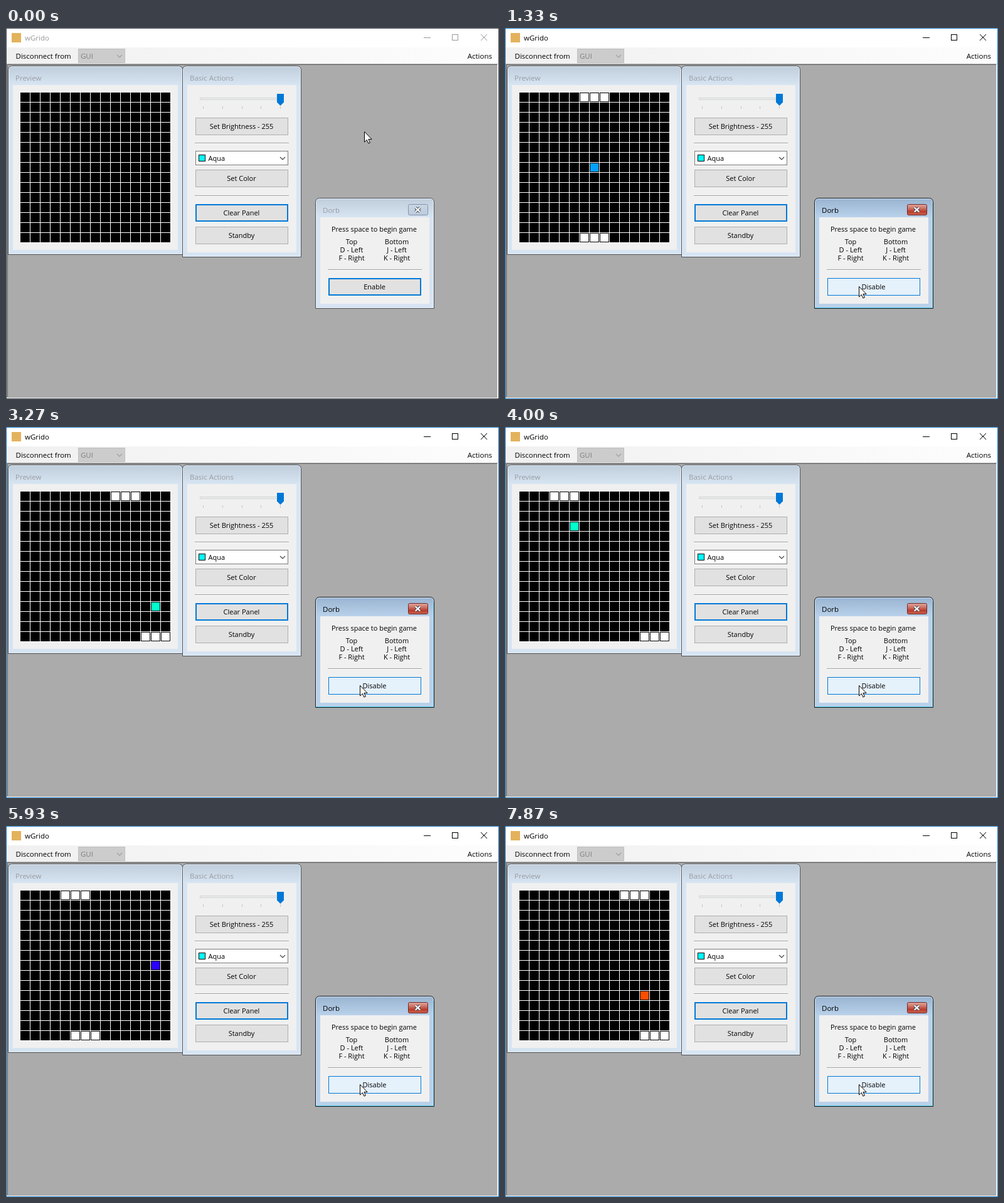
Recreate the animation shown at these times as an HTML page with a canvas. Size 786 px wide and 592 px high, loop 8 s.

```html
<!DOCTYPE html>
<html lang="en">
<head>
<meta charset="utf-8">
<title>LED panel controller</title>
<style>
  html, body { margin: 0; width: 100%; height: 100%; overflow: hidden; }
  canvas { display: block; }
</style>
</head>
<body>
<canvas id="stage" width="786" height="592"></canvas>
<script>
const ctx = document.getElementById('stage').getContext('2d');
const LOOP = 8000, TICK = 200 / 3;
const BLUE = '#0078d7', FACE = '#f0f0f0';

function rect(x, y, w, h, fill) {
  ctx.fillStyle = fill;
  ctx.fillRect(x, y, w, h);
}

function box(x, y, w, h, fill, border, line = 1) {
  rect(x, y, w, h, border);
  rect(x + line, y + line, w - 2 * line, h - 2 * line, fill);
}

function text(str, x, y, { size = 11, color = '#000', align = 'left' } = {}) {
  ctx.font = `${size}px "Open Sans", "Noto Sans", sans-serif`;
  ctx.textAlign = align;
  ctx.fillStyle = color;
  ctx.fillText(str, x, y);
}

function stroke(points, color, width = 1) {
  ctx.beginPath();
  points.forEach(([x, y], i) => i ? ctx.lineTo(x, y) : ctx.moveTo(x, y));
  ctx.strokeStyle = color;
  ctx.lineWidth = width;
  ctx.stroke();
}

function gradient(x0, y0, x1, y1, ...colors) {
  const g = ctx.createLinearGradient(x0, y0, x1, y1);
  colors.forEach((c, i) => g.addColorStop(i / (colors.length - 1), c));
  return g;
}

// Linear value between [time, value] keys.
function track(keys, t) {
  if (t <= keys[0][0]) return keys[0][1];
  for (let i = 1; i < keys.length; i++) {
    const [t0, a] = keys[i - 1], [t1, b] = keys[i];
    if (t < t1) return a + (b - a) * (t - t0) / (t1 - t0);
  }
  return keys[keys.length - 1][1];
}

/* ---------- Game ---------- */

const START = 40, FIRST_MOVE = 38.82, MOVE = 1.411;

// Rebounds at the paddles: horizontal direction and hue after each hit.
const HITS = [[1, 168], [-1, 183], [1, 250], [1, 312], [1, 18]];

const TOP = [[43, 6], [50, 10], [52, 10], [56, 5], [57, 5], [60, 3], [63, 3], [66, 0],
  [79, 0], [88, 4], [91, 4], [94, 5], [98, 5], [101, 10]];
const BOTTOM = [[40, 6], [45, 11], [47, 11], [50, 12], [71, 12], [75, 9], [77, 8],
  [80, 7], [82, 7], [88, 5], [103, 5], [112, 7], [114, 7], [115, 8], [118, 12]];

function ballAt(tick) {
  const ball = { x: 7, y: 7, hue: 202 };
  if (tick < START) return ball;
  const moves = Math.floor((tick - FIRST_MOVE) / MOVE) + 1;
  let dx = 1, dy = 1, hit = 0;
  for (let i = 0; i < moves; i++) {
    if (i && (ball.y === 1 || ball.y === 13)) {
      [dx, ball.hue] = HITS[hit++ % HITS.length];
      dy = -dy;
    }
    if (ball.x + dx < 0 || ball.x + dx > 14) dx = -dx;
    ball.x += dx;
    ball.y += dy;
  }
  return ball;
}

function cell(col, row, fill) {
  rect(24 + col * 16, 104 + row * 16, 13, 13, fill);
}

function drawGrid(tick, running) {
  rect(23, 103, 240, 240, '#fff');
  for (let i = 0; i < 225; i++) {
    rect(23 + i % 15 * 16, 103 + Math.floor(i / 15) * 16, 15, 15, '#000');
  }
  if (!running) return;
  const top = Math.round(track(TOP, tick)), bottom = Math.round(track(BOTTOM, tick));
  for (let i = 0; i < 3; i++) {
    cell(top + i, 0, '#fff');
    cell(bottom + i, 14, '#fff');
  }
  const ball = ballAt(tick);
  cell(ball.x, ball.y, `hsl(${ball.hue}, 100%, 50%)`);
}

/* ---------- Widgets ---------- */

function button(label, x, y, state = 'normal') {
  const [fill, border, line] = {
    normal: ['#e1e1e1', '#adadad', 1],
    focus: ['#e1e1e1', BLUE, 2],
    hover: ['#e5f1fb', BLUE, 1],
    pressed: ['#cce4f7', '#005499', 1],
  }[state];
  box(x, y, 148, 28, fill, border, line);
  text(label, x + 73.5, y + 18, { align: 'center' });
}

function separator(x, y) {
  rect(x, y, 150, 1, '#a0a0a0');
  rect(x, y + 1, 150, 1, '#fff');
}

function chevron(x, y, color) {
  stroke([[x, y], [x + 4, y + 4], [x + 8, y]], color, 1.2);
}

function childWindow(title, x, y, w, h, active) {
  ctx.beginPath();
  ctx.roundRect(x + .5, y + .5, w - 1, h - 1, [6, 6, 0, 0]);
  ctx.fillStyle = active ? '#b9d1ea' : '#d7e4f2';
  ctx.fill();
  ctx.save();
  ctx.clip();
  rect(x, y, w, 31, active ? gradient(0, y, 0, y + 31, '#98b3d0', '#b9d1ea')
                           : gradient(0, y, 0, y + 31, '#bfcddb', '#d7e4f2'));
  ctx.restore();
  ctx.beginPath();
  ctx.roundRect(x + 1.5, y + 1.5, w - 3, h - 3, [5, 5, 0, 0]);
  ctx.strokeStyle = active ? '#d3e5f8' : '#e6eef8';
  ctx.lineWidth = 1;
  ctx.stroke();
  if (active) {
    rect(x + 1, y + h - 2, w - 2, 1, '#4fd0f0');
    rect(x + w - 2, y + 8, 1, h - 9, '#8adcf3');
  }
  ctx.beginPath();
  ctx.roundRect(x + .5, y + .5, w - 1, h - 1, [6, 6, 0, 0]);
  ctx.strokeStyle = active ? '#1c1c1c' : '#4d5156';
  ctx.stroke();
  rect(x + 8, y + 31, w - 16, h - 39, FACE);
  text(title, x + 12, y + 24, { size: 11.5, color: active ? '#000' : '#999da3' });
}

function closeButton(active) {
  ctx.beginPath();
  ctx.roundRect(641.5, 281.5, 31, 17, 2);
  ctx.fillStyle = active ? gradient(0, 281, 0, 299, '#e5aaa0', '#d07a6d', '#b93a2a', '#cf6a55')
                         : gradient(0, 281, 0, 299, '#c9d6e5', '#bccbdd');
  ctx.fill();
  ctx.strokeStyle = active ? '#6b2a2c' : '#8393a9';
  ctx.lineWidth = 1;
  ctx.stroke();
  for (const [color, width] of [['#454b59', 4.4], ['#fff', 2.3]]) {
    stroke([[652.8, 286.5], [660.2, 293.5]], color, width);
    stroke([[660.2, 286.5], [652.8, 293.5]], color, width);
  }
}

/* ---------- Windows ---------- */

function drawMain(active) {
  const ink = active ? '#000' : '#999';
  box(0, 0, 786, 592, '#fff', active ? '#1779c6' : '#454b52');
  rect(9, 8, 15, 15, '#e3b25c');
  text('wGrido', 30, 20, { size: 11.5, color: ink });
  rect(666, 15, 11, 1, ink);
  box(711, 10, 10, 10, '#fff', ink);
  stroke([[757, 10], [767, 20]], ink);
  stroke([[767, 10], [757, 20]], ink);

  rect(1, 31, 784, 27, gradient(1, 0, 785, 0, FACE, '#fdfdfd'));
  text('Disconnect from', 15.5, 49, { size: 11.5 });
  box(115, 33, 75, 23, '#ccc', '#bfbfbf');
  text('GUI', 119, 49, { size: 11.5, color: '#808080' });
  chevron(177, 43, '#a0a0a0');
  text('Actions', 775, 49, { size: 11.5, align: 'right' });

  rect(1, 57, 784, 534, '#fff');
  rect(1, 57, 783, 533, '#a0a0a0');
  rect(2, 58, 782, 532, '#e3e3e3');
  rect(2, 58, 781, 531, '#696969');
  rect(3, 59, 780, 531, '#ababab');
}

function drawActions() {
  childWindow('Basic Actions', 281, 60, 190, 306, false);
  box(309, 111, 132, 4, '#e7eaea', '#d6d6d6');
  for (let i = 0; i < 5; i++) rect(Math.round(314 + i * 30.8), 125, 1, 4, '#c4c4c4');
  ctx.beginPath();
  for (const [x, y] of [[432, 105], [443, 105], [443, 118.5], [437.5, 124], [432, 118.5]]) ctx.lineTo(x, y);
  ctx.fillStyle = BLUE;
  ctx.fill();
  button('Set Brightness - 255', 302, 143);
  separator(301, 183);
  box(302, 196, 148, 23, '#fff', '#7a7a7a');
  box(307, 202, 11, 11, '#0ff', '#000');
  text('Aqua', 322.5, 212);
  chevron(437, 206, '#444');
  button('Set Color', 302, 226);
  separator(301, 267);
  button('Clear Panel', 302, 281, 'focus');
  button('Standby', 302, 317);
}

function drawGame(active, label, state) {
  childWindow('Dorb', 493, 271, 190, 177, active);
  closeButton(active);
  const center = { align: 'center' };
  text('Press space to begin game', 587, 325, center);
  ['Top', 'D - Left', 'F - Right'].forEach((s, i) => text(s, 551, 345 + i * 13, center));
  ['Bottom', 'J - Left', 'K - Right'].forEach((s, i) => text(s, 623, 345 + i * 13, center));
  separator(513, 385);
  button(label, 514, 399, state);
}

function drawCursor(x, y) {
  const shape = [[0, 0], [0, 16.5], [3.8, 13], [6.4, 18.6], [8.9, 17.5], [6.4, 12], [11.6, 12]];
  ctx.beginPath();
  shape.forEach(([px, py]) => ctx.lineTo(x + .5 + px, y + .5 + py));
  ctx.closePath();
  ctx.fillStyle = '#fff';
  ctx.fill();
  ctx.strokeStyle = '#000';
  ctx.lineWidth = 1;
  ctx.stroke();
}

/* ---------- Timeline ---------- */

const MOUSE_X = [[0, 571], [3, 574], [7, 568], [9, 564], [11, 563], [19, 563], [20, 564]];
const MOUSE_Y = [[0, 165], [2, 190], [4, 262], [6, 360], [8, 422], [9, 425], [11, 414], [19, 414], [20, 412]];

function draw(ms) {
  const tick = Math.floor((ms + 5) / TICK);
  const x = Math.round(track(MOUSE_X, tick)), y = Math.round(track(MOUSE_Y, tick));
  const active = tick >= 16, running = tick >= 18;
  const state = active && !running ? 'pressed' : y >= 399 ? 'hover' : 'focus';

  drawMain(active);
  childWindow('Preview', 3, 60, 279, 302, false);
  drawGrid(tick, running);
  drawActions();
  drawGame(active, running ? 'Disable' : 'Enable', state);
  drawCursor(x, y);
}

const began = performance.now();
function loop() {
  draw((performance.now() - began) % LOOP);
  requestAnimationFrame(loop);
}
loop();
</script>
</body>
</html>
```
